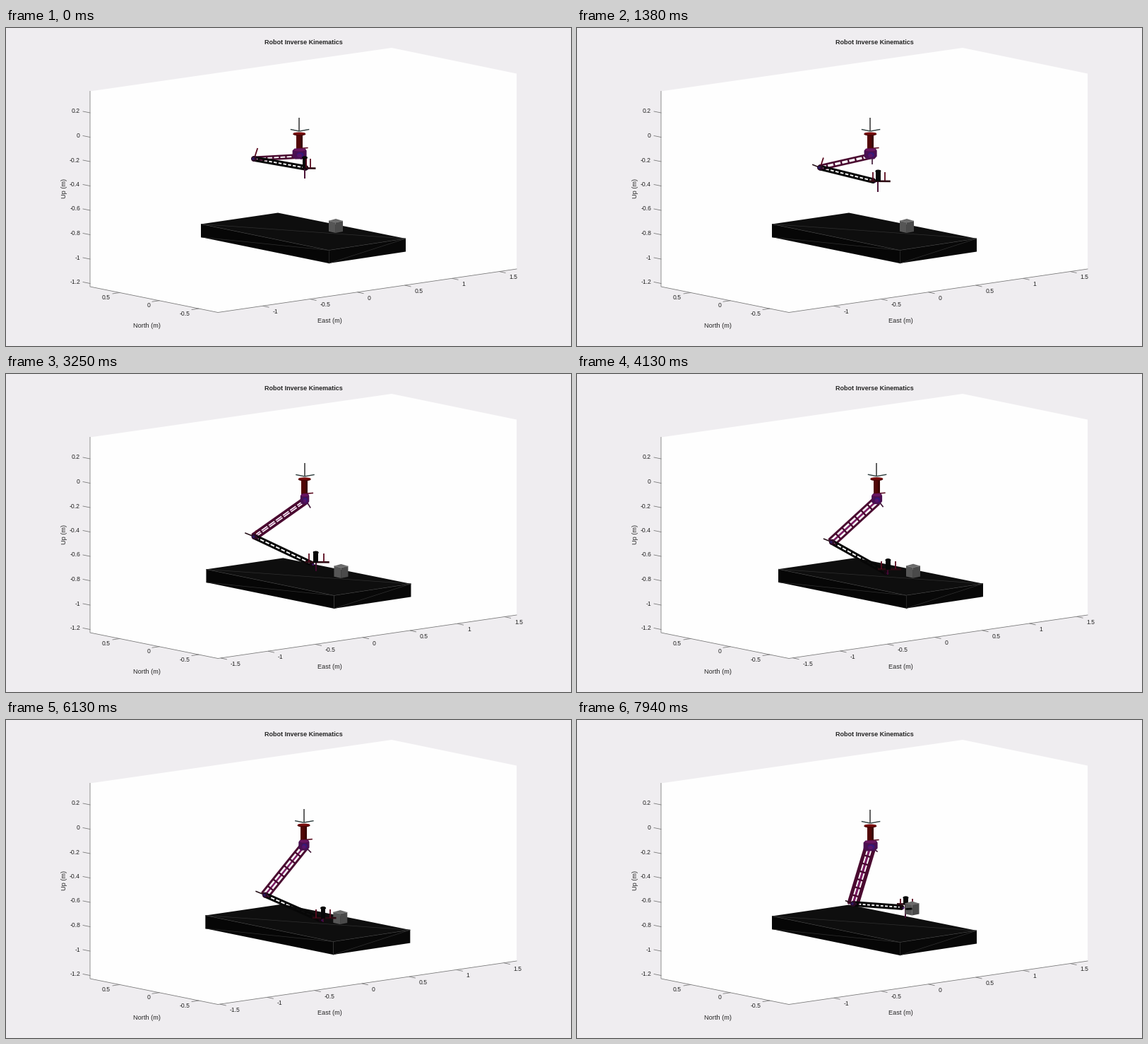
A matplotlib script that plays this animation: 800x450 px, repeating every 8 s.

```python
import numpy as np
import matplotlib.pyplot as plt
from matplotlib.animation import FuncAnimation
from matplotlib.patches import Circle, Ellipse, Polygon

W, H, DPI = 800, 450, 100
FRAMES, STEP = 125, 64
PT = 72 / DPI

plt.rcParams["font.family"] = "Liberation Sans"
fig = plt.figure(figsize=(W / DPI, H / DPI), dpi=DPI, facecolor="#efedf0")
ax = fig.add_axes([0, 0, 1, 1])
ax.set_xlim(0, W)
ax.set_ylim(H, 0)
ax.axis("off")

INK, AXIS = "#262626", "#757575"
MAROON, WINE, PLUM, BLACK = "#5a0a1e", "#4a0a30", "#7c1c64", "#070707"

# Pose keys, in pixels
TIMES = np.array([0, 1380, 2560, 4130, 5500, 6940, 7940])
POSE = {
    "shift": [0, 0, 5.5, 9, 8, 2.7, 0],
    "elbow_x": [351, 344, 346, 361, 364, 374, 391],
    "elbow_y": [185, 198, 222, 238, 242, 257, 260],
    "wrist_x": [425, 420, 428, 438, 440, 457, 460],
    "wrist_y": [198, 217, 254, 281, 282, 283, 265],
    "tool_x": [423, 426.5, 437, 440.5, 444, 459, 465.5],
    "tool_y": [198, 217, 254, 276, 279, 280, 260],
    "head_y": [182, 202, 239, 262, 265, 263, 250],
    "pin_l": [425, 418.5, 426.5, 431, 434, 449, 458],
    "pin_r": [430.5, 436, 448.5, 451, 454, 470, 475],
    "drop": [15, 16, 16, 8, 6, 6, 20],
    "axis_left": [3, 11, 14, 12, 13, 14, 11],
    "axis_up": [15, 14, 12, 4, 3, 3, 3],
    "tail_x": [2, 2, 7, 9, 9, 12, 10],
    "tail_y": [8, 16, 14, 12, 11, 11, 9],
    "hub": [10, 9, 5.5, 7.5, 7.5, 8, 10],
    "rail": [2.2, 3, 3, 5.5, 5.5, 5, 6],
    "rail_lw": [2.5, 2.6, 4, 3, 3, 3, 5],
    "finger": [0, 0, 0, 0, 0, 19, 9],
    "lift": [0, 0, 0, 0, 0, 0, 1],
}


def slopes(v):
    """Tangents of a monotone cubic through v at TIMES."""
    s = np.diff(v) / np.diff(TIMES)
    m = np.zeros(len(v))
    m[0], m[-1] = s[0], s[-1]
    for i in range(1, len(v) - 1):
        if s[i - 1] * s[i] > 0:
            m[i] = 2 * s[i - 1] * s[i] / (s[i - 1] + s[i])
    return m


SLOPE = {name: slopes(v) for name, v in POSE.items()}


def pose_at(t):
    i = min(np.searchsorted(TIMES, t, side="right") - 1, len(TIMES) - 2)
    h = TIMES[i + 1] - TIMES[i]
    u = (t - TIMES[i]) / h
    a, b = u * u * (3 - 2 * u), u * (1 - u)
    return {
        k: v[i] + (v[i + 1] - v[i]) * a
        + h * b * (SLOPE[k][i] * (1 - u) - SLOPE[k][i + 1] * u)
        for k, v in POSE.items()
    }


moving = []


def keep(artist):
    moving.append(artist)
    return artist


def line(p, q, color, lw, cap="butt"):
    return keep(ax.plot([p[0], q[0]], [p[1], q[1]], color=color, lw=lw * PT,
                        solid_capstyle=cap, zorder=2)[0])


def shape(points, color):
    keep(ax.add_patch(Polygon(points, fc=color, lw=0, zorder=2)))


def rect(x0, y0, x1, y1, color):
    shape([(x0, y0), (x1, y0), (x1, y1), (x0, y1)], color)


def oval(x, y, w, h, color):
    keep(ax.add_patch(Ellipse((x, y), w, h, fc=color, lw=0, zorder=2)))


def dot(p, r, color):
    keep(ax.add_patch(Circle(p, r, fc=color, lw=0, zorder=2)))


def label(x, y, s, ha="center", px=8.6, **kw):
    return ax.text(x, y, s, ha=ha, va="center", fontsize=px * PT, color=INK, **kw)


# Axes box: north runs along the lower left edge, east along the lower right
CORNER = np.array([300, 402.5])
EAST_SLOPE, NORTH_SLOPE = -61.5 / 423, 36.5 / 181


def east_y(x):
    return CORNER[1] + (x - CORNER[0]) * EAST_SLOPE


def draw_static():
    ax.add_patch(Polygon([(119, 89.5), (546, 28), (723, 64.5), (723, 341),
                          CORNER, (119, 366)], fc="#fefefe", lw=0, zorder=0))
    ax.plot([119, 119, 300, 723], [89.5, 366, 402.5, 341], color=AXIS,
            lw=0.8 * PT, zorder=1)
    for i in range(8):
        y = 118 + 34.5 * i
        ax.plot([109, 119], [y, y + 2], color=AXIS, lw=0.8 * PT, zorder=1)
        label(105, y, f"{0.2 - 0.2 * i:.1f}".replace(".0", "").replace("-0", "-0")
              if i != 1 else "0", "right")
    for i, s in enumerate(("0.5", "0", "-0.5")):
        x = 161 + 56 * i
        y = 366 + (x - 119) * NORTH_SLOPE
        ax.plot([x, x - 10], [y, y + 1.5], color=AXIS, lw=0.8 * PT, zorder=1)
        label(x - 13, y + 7, s, "right")
    label(421.5, 20.5, "Robot Inverse Kinematics", px=9.05, weight="bold")
    label(199.5, 421.5, "North (m)", px=9.2)
    label(458, 414.8, "East (m)", px=9.2)
    label(82.5, 227, "Up (m)", px=9.2, rotation=90)


def draw_east_ticks(dx):
    for i, s in enumerate(("-1.5", "-1", "-0.5", "0", "0.5", "1", "1.5")):
        x = 296.5 + 67 * i + dx
        if x < CORNER[0]:
            continue
        y = east_y(x)
        line((x, y), (x + 9, y + 2), AXIS, 0.8)
        keep(label(x + 14, y + 8.4, s, "left"))


def draw_box(left, front, right, back, depth, colors):
    """Block seen from above: top, left face and right face."""
    down = np.array([0, depth])
    shape([left, back, right, front], colors[0])
    shape([left, front, front + down, left + down], colors[1])
    shape([front, right, right + down, front + down], colors[2])


def draw_table(off):
    left, front, right, back = np.array(
        [(276, 277.5), (457, 314.5), (566, 298), (385, 261.5)]) + off
    down = np.array([0, 18.5])
    draw_box(left, front, right, back, 18.5, ("#0e0e0e", "#060606", "#080808"))
    for p, q in ((left, right), (left, front), (front, right),
                 (left + down, front), (front + down, right),
                 (front, front + down)):
        line(p, q, "#303030", 0.7)


def draw_cube(off):
    left, front, right, back = np.array(
        [(457, 272.8), (466.8, 275), (477, 273), (467, 270)]) + off
    draw_box(left, front, right, back, 15, ("#6a6a6a", "#565656", "#4a4a4a"))
    for p, q in ((left, front), (front, right)):
        line(p, q, "#7c7c7c", 0.7)


def draw_truss(a, b, off, lw, bars, color, core=None):
    a, b = np.array(a), np.array(b)
    d = (b - a) / np.hypot(*(b - a))
    n = np.array([-d[1], d[0]]) * off
    mid = max(0, off - 3) * 1.1
    if core and mid > 0.2:
        line(a, b, core, mid)
    for side in (n, -n):
        line(a + side, b + side, color, lw, "round")
    for u in np.linspace(0, 1, bars):
        c = a + (b - a) * u
        line(c - n, c + n, color, 2.4)


def draw_base(x, y):
    line((x, y), (x, y - 19), "#303030", 1.5)
    line((x, y), (x - 12.5, y - 2.5), "#2c3c3c", 1.4)
    line((x, y), (x + 14, y - 2.5), "#2c3c3c", 1.4)
    rect(x - 4.3, y + 4, x + 4.3, y + 26, "#520606")
    rect(x + 1.5, y + 4, x + 4.3, y + 26, "#3a0404")
    oval(x, y + 4.2, 18, 4.6, "#4a0505")
    oval(x, y + 3.2, 17.5, 3.4, "#7a0d0d")


def draw_hub(x, y, p):
    w = p["hub"]
    line((x, y - 7), (x + 12, y - 8), MAROON, 1.6)
    line((x + 2, y + 3), (x + p["tail_x"], y + p["tail_y"]), "#3a1030", 1.6)
    shape([(x - w, y - 4), (x - w * 0.7, y - 7), (x + w * 0.8, y - 7),
           (x + w, y - 4), (x + w, y + 4), (x + w * 0.6, y + 8),
           (x - w * 0.6, y + 8), (x - w, y + 5)], "#4a1050")
    oval(x, y - 5, w * 1.7, 4, "#6a1560")
    oval(x + w * 0.1, y + 2, w, 7, "#35187a")
    oval(x, y + 3, w * 0.7, 5, "#5a1468")


def draw_arm(p, x, y):
    elbow = (p["elbow_x"], p["elbow_y"])
    wrist = (p["wrist_x"], p["wrist_y"])
    draw_truss((x - 1, y + 4), elbow, p["rail"], p["rail_lw"], 8, WINE, PLUM)
    draw_hub(x, y, p)
    draw_truss(elbow, wrist, 2.4, 2.9, 12, BLACK)
    ex, ey = elbow
    line(elbow, (ex - p["axis_left"], ey - 0.4 * p["axis_left"]), "#251018", 1.6)
    up = p["axis_up"]
    line((ex + 1, ey - 2), (ex + 0.35 * up, ey - up), MAROON, 1.8)
    dot(elbow, 4, "#2c0a24")
    dot((ex - 1, ey), 1.8, "#2a1860")
    dot(wrist, 3.4, "#14060f")
    dot((wrist[0] + 2, wrist[1] + 1), 1.4, "#401468")


def draw_gripper(p):
    x, y, top = p["tool_x"], p["tool_y"], p["head_y"]
    line((x, y), (x, y + p["drop"]), "#43092e", 1.9)
    line((p["pin_l"] - 5, y + 0.3), (p["pin_r"] + 8, y + 0.6), "#2c0a12", 2.6)
    rect(x - 3.4, top, x + 3.4, y + 1, BLACK)
    oval(x, top + 1.5, 8, 4.5, BLACK)
    for pin in (p["pin_l"], p["pin_r"]):
        line((pin, top + 3), (pin, y), MAROON, 1.8)


def update(i):
    while moving:
        moving.pop().remove()
    t = i * STEP
    p = pose_at(t)
    dx = p["shift"]
    off = np.array([dx, dx * EAST_SLOPE])
    draw_east_ticks(dx)
    draw_table(off)
    x, y = 415.3 + dx, 146 + off[1]
    draw_base(x, y)
    cube = off + np.array([7.5, -13.5]) * p["lift"]
    near = t > 6300
    if not near:
        draw_cube(cube)
    draw_arm(p, x + 0.3, y + 31.5)
    draw_gripper(p)
    if near:
        draw_cube(cube)
        fx, fy = cube + (457, 281)
        line((fx + 1, fy), (fx + 1 + p["finger"], fy - 0.5), BLACK, 2.8)
    return moving


draw_static()
anim = FuncAnimation(fig, update, frames=FRAMES, interval=STEP,
                     init_func=lambda: moving, repeat=True, repeat_delay=0,
                     blit=False)
plt.show()
```
